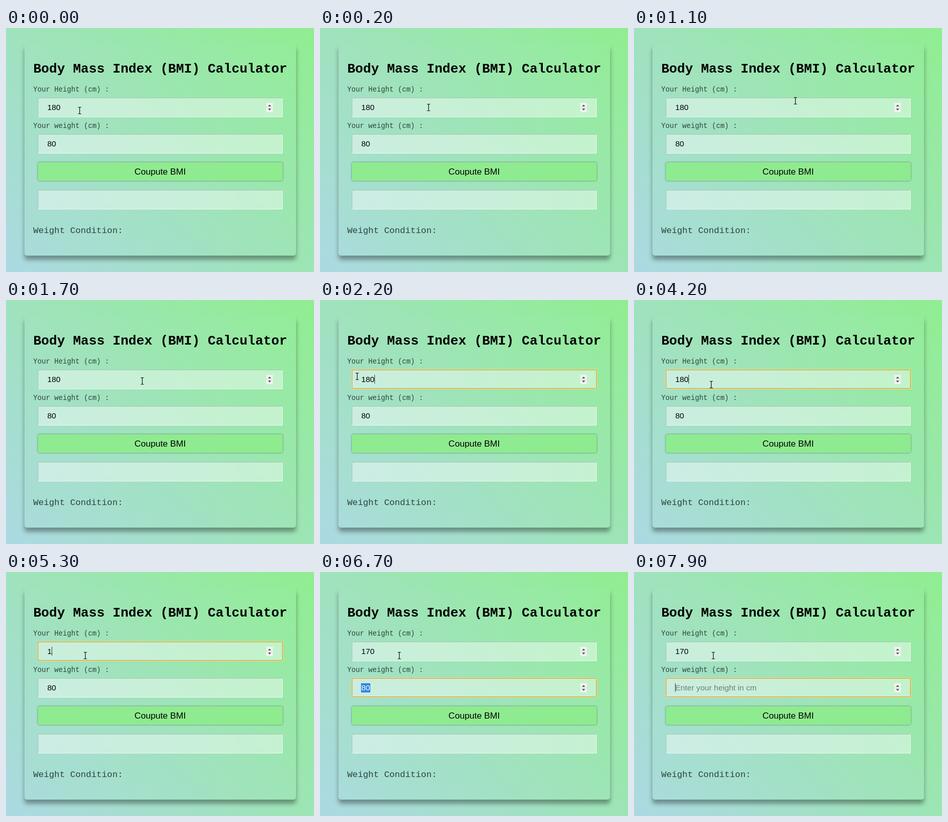
Animation of 600 by 476 pixels, one loop 8000 ms. Source, as an HTML page:

```html
<!DOCTYPE html>
<html lang="en">
<head>
<meta charset="utf-8">
<title>BMI Calculator</title>
<style>
  html, body { margin: 0; width: 100%; height: 100%; overflow: hidden; }
  body { background: linear-gradient(45deg, lightblue -4%, lightgreen); }
  .card {
    position: absolute; left: 36px; top: 31px; width: 529px; height: 413px;
    border-radius: 5px; background: rgba(160, 222, 190, .08);
    box-shadow: 0 8px 9px rgba(0, 0, 0, .36);
  }
  .button {
    position: absolute; left: 62px; top: 262px; width: 477px; height: 36px;
    border-radius: 4px; background: #8feb8f; box-shadow: 0 0 3px rgba(40, 70, 60, .7);
  }
  .field {
    position: absolute; left: 62px; box-sizing: border-box; width: 477px; height: 38px;
    background: rgba(255, 255, 255, .42); background-clip: padding-box;
    border: 1px solid; border-color: #a9c5b6 #eaf8ee #eaf8ee #a9c5b6;
  }
  svg { position: absolute; left: 0; top: 0; display: block; }
  text { font-family: "Liberation Sans", Arial, sans-serif; font-size: 15.43px; white-space: pre; }
  .mono { font-family: "Liberation Mono", "Courier New", monospace; font-size: 13.71px; fill: #2c4439; }
  .title { font-size: 25.75px; font-weight: bold; fill: #000; }
  .status { font-size: 17.14px; }
  .label { font-size: 17.14px; }
</style>
</head>
<body>
<div class="card"></div>
<div class="field" style="top:136px"></div>
<div class="field" style="top:207px"></div>
<div class="field" style="top:316px"></div>
<div class="button"></div>
<svg width="600" height="476" viewBox="0 0 600 476">
  <defs>
    <g id="ring" fill="none">
      <rect x="61.5" y="135.5" width="478" height="38" rx="2.5" stroke="#f6dc9c"/>
      <rect x="62.5" y="136.5" width="476" height="36" rx="1.5" stroke="#dd970f"/>
    </g>
    <g id="spin">
      <rect x="507" y="146" width="13" height="18" fill="#eff2f0"/>
      <path d="M507 155H520" stroke="#d5dcd8" stroke-width=".8"/>
      <path d="M510.4 153L513.5 149.4L516.6 153ZM510.4 157.2L513.5 160.8L516.6 157.2Z" fill="#4a4f4d"/>
    </g>
  </defs>
  <text class="mono title" x="300.4" y="87.3" text-anchor="middle">Body Mass Index (BMI) Calculator</text>
  <text class="mono" x="53" y="123.5">Your Height (cm) :</text>
  <text class="mono" x="53" y="194.5">Your weight (cm) :</text>
  <text class="mono status" x="53" y="399.5">Weight Condition:</text>
  <text class="label" x="300.3" y="286.2" text-anchor="middle">Coupute BMI</text>

  <use id="ring1" href="#ring"/>
  <use id="ring2" href="#ring" y="71"/>
  <use id="spin1" href="#spin"/>
  <use id="spin2" href="#spin" y="71"/>
  <rect id="selection" x="80" y="217" width="18" height="18" fill="#2f86e0"/>
  <text id="height" x="80.4" y="159.8"></text>
  <text id="weight" x="80.4" y="230.8"></text>
  <rect id="caret" width="1" height="17" fill="#333"/>

  <path id="beam" d="M-3 -6.5H-1L0 -5.5L1 -6.5H3M0 -5.5V5.5M-3 6.5H-1L0 5.5L1 6.5H3" fill="none" stroke="#111" stroke-width="1.2"/>
  <path id="arrow" d="M0 0V14L3.2 11.1L5.4 16.2L7.7 15.2L5.5 10.2H9.9Z" fill="#fff" stroke="#222" stroke-linejoin="round"/>
</svg>
<script>
const LOOP = 8000, STEP = 100, DIGIT = 15.43 * 0.5562;
const el = id => document.getElementById(id);
const show = (id, on) => { el(id).style.display = on ? "" : "none"; };

// time, x, y of the pointer
const path = [
  [0, 143, 161], [100, 168, 159], [400, 296, 146], [1000, 296, 146], [1100, 314, 142],
  [1300, 392, 150], [1500, 352, 158], [1900, 178, 157], [2000, 146, 155],
  [2100, 114, 152], [2200, 72, 149], [2300, 48, 147], [2500, 31, 146],
  [3500, 31, 146], [3600, 7, 137], [3700, 28, 152], [3800, 84, 162],
  [4000, 142, 166], [4100, 142, 166], [4200, 150, 165], [4400, 154, 163]
];

// time, focused field, height value, weight value, caret visible
const states = [
  [0, 0, "180", "80", false],
  [2000, 1, "180", "80", true],
  [2400, 0, "180", "80", false],
  [4200, 1, "180", "80", true],
  [4800, 1, "18", "80", true],
  [4900, 1, "18", "80", false],
  [5100, 1, "1", "80", false],
  [5300, 1, "1", "80", true],
  [5800, 1, "1", "80", false],
  [6100, 1, "17", "80", true],
  [6300, 1, "170", "80", true],
  [6600, 2, "170", "80", false],
  [7900, 2, "170", "", true]
];

function pointerAt(t) {
  const i = path.findIndex(p => p[0] > t);
  if (i < 0) return path[path.length - 1].slice(1);
  const a = path[i - 1], b = path[i], k = (t - a[0]) / (b[0] - a[0]);
  return [a[1] + (b[1] - a[1]) * k, a[2] + (b[2] - a[2]) * k];
}

function draw(t) {
  const [, focus, height, weight, caret] = states.filter(s => s[0] <= t).pop();
  const [x, y] = pointerAt(t);
  const hover = x > 62 && x < 539 && y > 136 && y < 174;
  const selected = focus === 2 && weight !== "";

  show("ring1", focus === 1);
  show("ring2", focus === 2);
  show("spin1", hover || focus === 1);
  show("spin2", focus === 2);
  show("selection", selected);
  el("height").textContent = height;
  el("weight").textContent = weight || "Enter your height in cm";
  el("weight").setAttribute("fill", selected ? "#fff" : weight ? "#000" : "#6f7f77");

  show("caret", caret);
  const value = focus === 2 ? weight : height;
  el("caret").setAttribute("x", Math.round(80.2 + value.length * DIGIT));
  el("caret").setAttribute("y", focus === 2 ? 217 : 146);

  show("beam", hover);
  show("arrow", !hover);
  el(hover ? "beam" : "arrow").setAttribute("transform", `translate(${Math.round(x) + .5} ${Math.round(y)})`);
}

const start = performance.now();
function tick() {
  const t = (performance.now() - start) % LOOP;
  draw(Math.floor(t / STEP) * STEP);
  requestAnimationFrame(tick);
}
tick();
</script>
</body>
</html>
```
